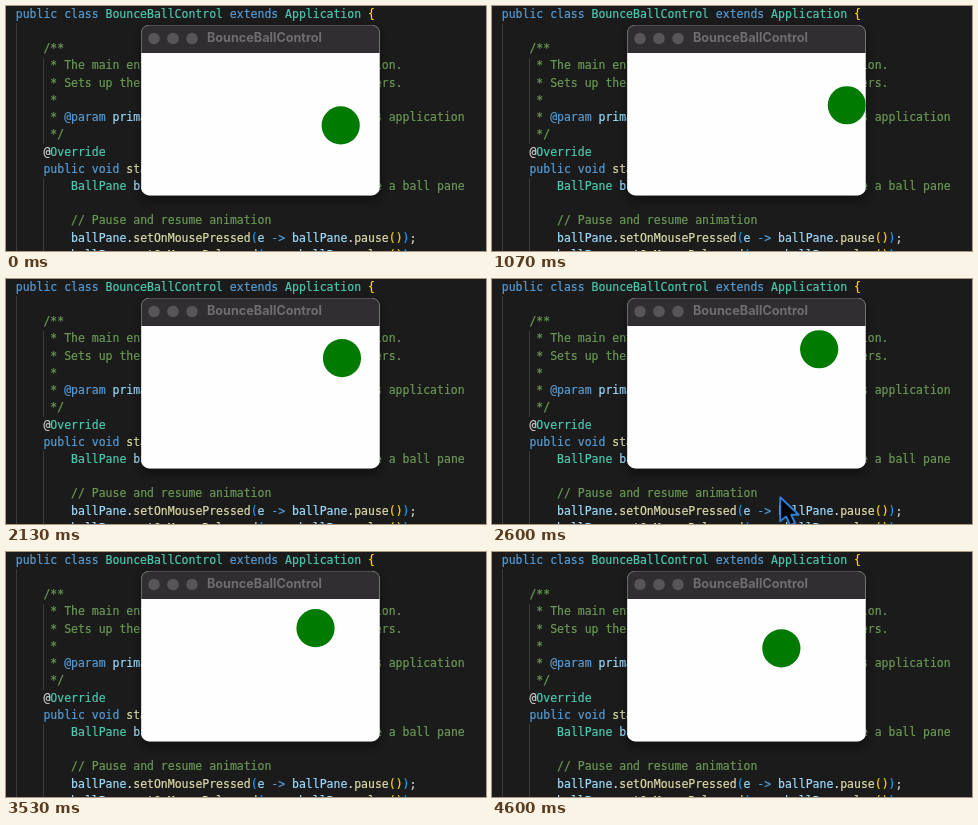
Recreate the animation shown at these times as an HTML page. Size 480 by 245 pixels, loop 4670 ms.

```html
<!DOCTYPE html>
<html lang="en">
<head>
<meta charset="utf-8">
<title>BounceBallControl</title>
<style>
  html, body { margin: 0; width: 100%; height: 100%; overflow: hidden; background: #1b1b1b; }
  svg { display: block; width: 100vw; height: 100vh; }
  #code text { font: 11.48px "DejaVu Sans Mono", monospace; white-space: pre; }
  #code tspan { fill: currentColor; stroke: currentColor; stroke-width: .2; }
  #title { font: 700 12.65px Inter, sans-serif; fill: #706d71; }
  .k { color: #569cd6; } .t { color: #4ec9b0; } .f { color: #dcdcaa; }
  .v { color: #9cdcfe; } .c { color: #6a9955; } .p { color: #d4d4d4; }
  .y { color: #ffd700; } .m { color: #da70d6; } .b { color: #179fff; }
</style>
</head>
<body>
<svg viewBox="0 0 480 245">
  <defs>
    <clipPath id="frame"><rect x="135.2" y="19" width="238.5" height="170.4" rx="8"/></clipPath>
    <filter id="blur" x="-20%" y="-20%" width="140%" height="140%"><feGaussianBlur stdDeviation="5"/></filter>
  </defs>
  <rect width="480" height="245" fill="#1b1b1b"/>
  <path d="M10.5 17V245M37.5 52V138M37.5 172V245" stroke="#3a3a3a" fill="none"/>
  <g id="code"></g>
  <rect x="135" y="23" width="239" height="171" rx="8" fill="#000" opacity=".4" filter="url(#blur)"/>
  <g clip-path="url(#frame)">
    <rect x="135" y="19" width="239" height="171" fill="#fefefe"/>
    <rect x="135" y="19" width="239" height="28" fill="#312e32"/>
    <g fill="#58555a">
      <circle cx="148" cy="32.5" r="5.8"/>
      <circle cx="167" cy="32.5" r="5.8"/>
      <circle cx="186" cy="32.5" r="5.8"/>
    </g>
    <text id="title" x="201" y="35.5">BounceBallControl</text>
    <circle id="ball" r="19.1" fill="#007a00"/>
  </g>
  <rect x="135.5" y="19.4" width="238" height="169.7" rx="7.7" fill="none" stroke="#fff" stroke-opacity=".2" stroke-width=".8"/>
  <path id="cursor" d="M0 0V24L6 19.3 10 28 14.8 25.7 11 17.5H18.5Z"
        fill="#000" stroke="#2f7fd8" stroke-width="1.9" stroke-linejoin="round"/>
</svg>
<script>
const SVG = "http://www.w3.org/2000/svg";
const get = id => document.getElementById(id);
const ball = get("ball"), cursor = get("cursor");

// Each line: row, column, then "kind:text" tokens
const lines = [
  [0, 0, "k:public class ", "t:BounceBallControl ", "k:extends ", "t:Application ", "y:{"],
  [2, 4, "c:/**"],
  [3, 5, "c:* The main entry point for this JavaFX application."],
  [4, 5, "c:* Sets up the ball pane and registers its handlers."],
  [5, 5, "c:*"],
  [6, 5, "c:* ", "k:@param ", "v:primaryStage ", "c:the primary stage for this application"],
  [7, 5, "c:*/"],
  [8, 4, "p:@", "t:Override"],
  [9, 4, "k:public void ", "f:start", "m:(", "t:Stage ", "v:primaryStage", "m:) {"],
  [10, 8, "t:BallPane ", "v:ballPane ", "p:= ", "k:new ", "f:BallPane", "b:()", "p:; ", "c:// Create a ball pane"],
  [12, 8, "c:// Pause and resume animation"],
  [13, 8, ...handler("Pressed", "pause")],
  [14, 8, ...handler("Released", "play")]
];

function handler(event, action) {
  return ["v:ballPane", "p:.", "f:setOnMouse" + event, "b:(", "v:e ", "k:-> ",
    "v:ballPane", "p:.", "f:" + action, "y:()", "b:)", "p:;"];
}

for (const [row, col, ...tokens] of lines) {
  const text = document.createElementNS(SVG, "text");
  text.setAttribute("x", 9.8 + col * 6.911);
  text.setAttribute("y", 11.6 + row * 17.24);
  for (const token of tokens) {
    const span = document.createElementNS(SVG, "tspan");
    span.setAttribute("class", token[0]);
    span.textContent = token.slice(2);
    text.append(span);
  }
  get("code").append(text);
}

const LOOP = 4670, FPS = 15, SPEED = 0.0189;
const RIGHT = 355.5, TOP = 64.4;

function draw(now) {
  const t = Math.floor((now % LOOP + 4) * FPS / 1000) * 1000 / FPS;
  const d = t * SPEED;
  // Fold straight travel back at the right and top walls
  ball.setAttribute("cx", RIGHT - Math.abs(RIGHT - 334.7 - d));
  ball.setAttribute("cy", TOP + Math.abs(119.4 - d - TOP));

  // Pointer dips in over the lower edge and leaves again
  const s = (t - 2600) / 200;
  cursor.setAttribute("transform", `translate(${288.2 + 6 * s} ${218.3 + 30 * s * s})`);
  cursor.setAttribute("visibility", Math.abs(s) < 1 ? "visible" : "hidden");
}

const start = performance.now();
function tick() {
  draw(performance.now() - start);
  requestAnimationFrame(tick);
}
tick();
</script>
</body>
</html>
```
